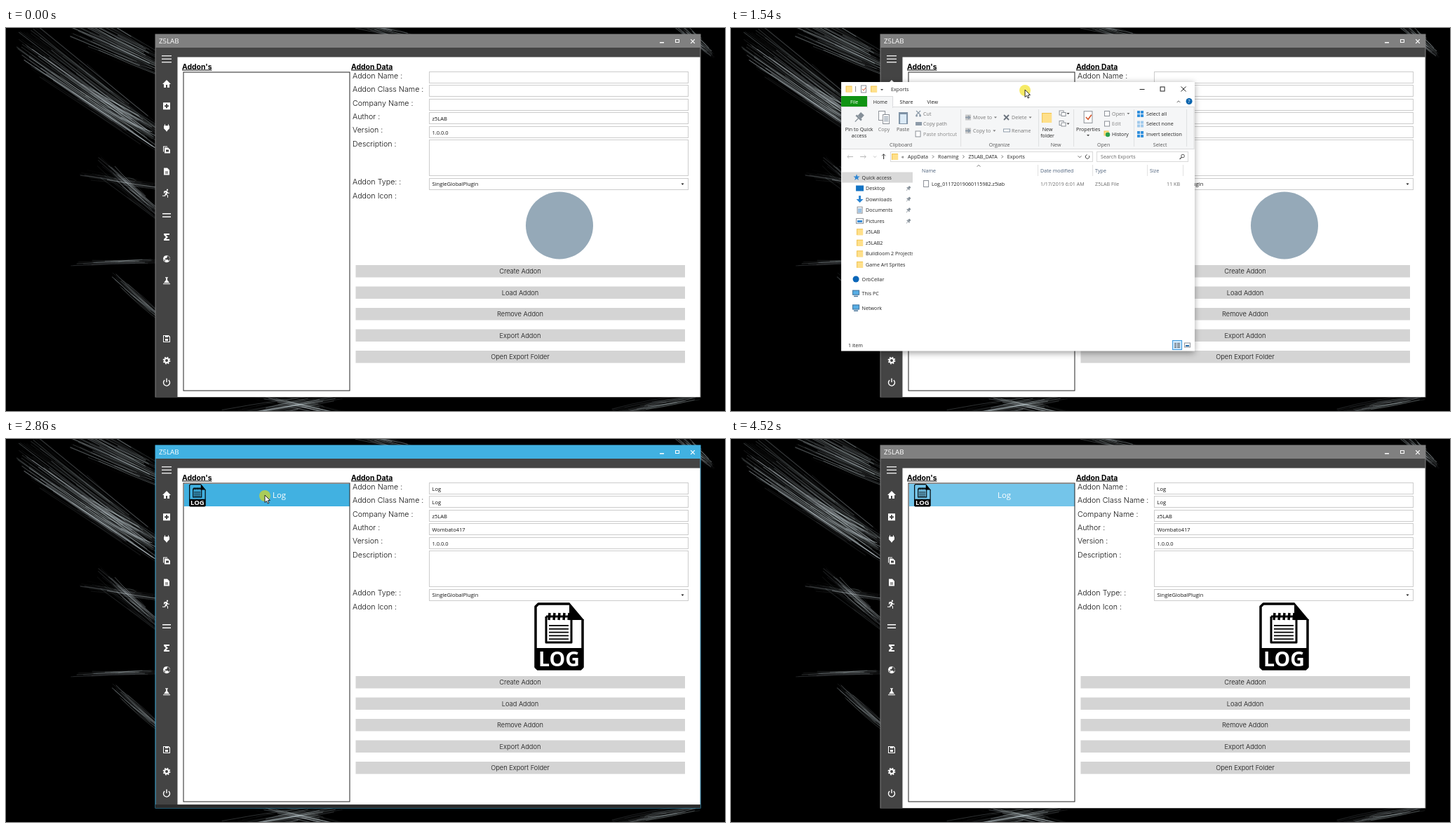
Animation, 1025 px wide and 546 px high, one loop 4.54 s. Source, as an HTML page with a canvas:

```html
<!DOCTYPE html>
<html lang="en">
<head>
<meta charset="utf-8">
<style>
html, body { margin: 0; width: 100%; height: 100%; overflow: hidden; background: #000; }
canvas { display: block; width: 1025px; height: 546px; }
</style>
</head>
<body>
<canvas id="stage" width="1025" height="546"></canvas>
<script>
const LOOP = 4540;
const UI = '"Open Sans", "Noto Sans", sans-serif';
const GEO = 'Inter, "Open Sans", sans-serif';
let g = document.getElementById('stage').getContext('2d');

// ---------- helpers ----------
const span = (t, a, b) => Math.max(0, Math.min(1, (t - a) / (b - a)));
const smooth = k => k * k * (3 - 2 * k);
const easeOut = k => 1 - (1 - k) ** 3;

function rect(x, y, w, h, fill, stroke) {
  if (fill) { g.fillStyle = fill; g.fillRect(x, y, w, h); }
  if (stroke) { g.strokeStyle = stroke; g.lineWidth = 1; g.strokeRect(x + .5, y + .5, w - 1, h - 1); }
}
// y is the middle of the capital letters
function text(s, x, y, size, color = '#111', align = 'left', font = UI, weight = 400) {
  g.font = `${weight} ${size}px ${font}`;
  g.textAlign = align;
  g.fillStyle = color;
  g.fillText(s, x, y + size * .36);
}
function trace(points) {
  g.beginPath();
  for (let i = 0; i < points.length; i += 2) g.lineTo(points[i], points[i + 1]);
}
function line(color, width, ...points) {
  g.strokeStyle = color; g.lineWidth = width;
  trace(points);
  g.stroke();
}
function poly(fill, ...points) {
  g.fillStyle = fill;
  trace(points);
  g.fill();
}
function disc(x, y, r, fill) {
  g.fillStyle = fill;
  g.beginPath(); g.arc(x, y, r, 0, 7); g.fill();
}
function arc(x, y, r, a, b, color, width) {
  g.strokeStyle = color; g.lineWidth = width;
  g.beginPath(); g.arc(x, y, r, a, b); g.stroke();
}
function cross(x, y, r, color, width) {
  line(color, width, x - r, y - r, x + r, y + r);
  line(color, width, x + r, y - r, x - r, y + r);
}
function at(x, y, scale, paint) {
  g.save();
  g.translate(x, y); g.scale(scale, scale);
  paint();
  g.restore();
}
const caret = (x, y, color = '#444') => poly(color, x - 2, y - 1, x + 2, y - 1, x, y + 1.3);
// (dx, dy) is the way the tip points
const chevron = (x, y, dx, dy, color = '#555') =>
  line(color, .9, x - dx - 2 * dy, y - dy - 2 * dx, x + dx, y + dy, x - dx + 2 * dy, y - dy + 2 * dx);

// ---------- wallpaper ----------
// start, end and half width of each sheaf of fibres
const SHEAVES = [
  [15, 15, 230, 170, 45], [100, 85, 230, 155, 20], [90, -10, 235, 60, 30],
  [105, 208, 230, 228, 8], [130, 190, 230, 275, 18], [90, 335, 230, 331, 5], [150, 350, 230, 420, 12],
  [280, 560, 480, 525, 14], [350, 522, 500, 556, 10], [860, 550, 990, 525, 8],
  [480, -10, 580, 12, 7], [950, -15, 1010, 40, 14]
];
function makeWallpaper() {
  const c = document.createElement('canvas');
  c.width = 1025; c.height = 546;
  const ink = c.getContext('2d');
  let seed = 11;
  const rnd = () => (seed = (seed * 16807) % 2147483647) / 2147483647;
  const off = s => (rnd() + rnd() - 1) * s;
  ink.fillRect(0, 0, 1025, 546);
  for (const [x0, y0, x1, y1, half] of SHEAVES)
    for (let i = 0; i < 12 + 2.5 * half; i++) {
      const shift = off(half), a = rnd() * .5, b = .6 + rnd() * .4;
      const px = k => x0 + (x1 - x0) * k;
      const py = k => y0 + (y1 - y0) * k + shift * (1.1 - .5 * k) + off(3);
      ink.strokeStyle = `rgba(200,212,216,${.05 + .4 * rnd() ** 3})`;
      ink.lineWidth = .4 + rnd() * .8;
      ink.beginPath();
      ink.moveTo(px(a), py(a));
      ink.quadraticCurveTo(px((a + b) / 2), py((a + b) / 2) + off(6), px(b), py(b));
      ink.stroke();
    }
  return c;
}
const wallpaper = makeWallpaper();

// ---------- main window ----------
// drawn in a 12 pixel square
const ICONS = [
  'M6 0 0 6h2v5h3V7h2v4h3V6h2z',
  'M1 1h10v10H1z M5 3v2H3v2h2v2h2V7h2V5H7V3z',
  'M4 1v2h4V1h1v2h1v4L7 10v1H5v-1L2 7V3h1V1z',
  'M1 1h6v1H2v7H1z M3 3h5l3 3v5H3z M5 6v3h4V6z',
  'M2 1h5l3 3v7H2z M4 6v1h4V6z M4 8v1h4V8z',
  'M6 0h2v2H6z M2 3l3-1 2 1 1 2h2v1H7L6 7l2 2v3H7V9L5 8 4 10H0V9h3l2-5-2 1v1H2z',
  'M0 3h12v1.500H0z M0 7.500h12V9H0z',
  'M2 1h8v2H5l3 3-3 3h5v2H2V9l3-3-3-3z',
  'M6 1a5 5 0 1 0 .01 0z M7 2h2l2 4-2 3-1-2H4V5h2z M1 6l3 2v2z',
  'M4 1h4v1H7v3l3 4H2l3-4V2H4z M1 10h10v1H1z',
  'M1 1h8l2 2v8H1z M2 2v8h8V4L8 2z M4 2h4v2H4z M4 6h4v3H4z'
].map(d => new Path2D(d));

function sidebar() {
  for (let i = -1; i < 2; i++) rect(222, 43.5 + 4.5 * i, 14, 1.4, '#e8e8e8');
  ICONS.forEach((icon, i) => at(223, 74 + 31.15 * i + (i > 9 ? 51.5 : 0), 1, () => {
    g.fillStyle = '#fff';
    g.fill(icon, 'evenodd');
  }));
  arc(229, 474, 3, 0, 7, '#fff', 2);
  g.setLineDash([1.8, 1.73]);
  arc(229, 474, 4.5, 0, 7, '#fff', 1.8);
  g.setLineDash([]);
  arc(229, 505.5, 4.5, -.9, Math.PI + .9, '#fff', 1.4);
  line('#fff', 1.4, 229, 499.5, 229, 505);
}

// 71 by 97 units
function logIcon(x, y, scale) {
  at(x, y, scale, () => {
    g.lineJoin = 'round';
    line('#000', 3.5, 50, 2, 6, 2, 2, 6, 2, 92, 5, 95, 66, 95, 69, 92, 69, 24);
    poly('#000', 50, 0, 71, 25, 50, 25);
    rect(2, 65, 67, 30, '#000');
    rect(17, 20, 36, 37, null, '#000');
    line('#000', 3, 17, 20, 17, 57, 53, 57, 53, 20, 17, 20);
    for (let i = 0; i < 5; i++) {
      line('#000', 3.5, 21 + i * 7, 25, 22 + i * 7, 15);
      line('#000', 1.8, 21, 33 + i * 4.8, 49, 33 + i * 4.8);
    }
    text('LOG', 35.5, 80.5, 28.5, '#fff', 'center', UI, 700);
  });
}

const LABELS = ['Addon Name', 'Addon Class Name', 'Company Name', 'Author', 'Version', 'Description', 'Addon Type:', 'Addon Icon'];
const BUTTONS = ['Create Addon', 'Load Addon', 'Remove Addon', 'Export Addon', 'Open Export Folder'];
const EMPTY = ['', '', '', 'z5LAB', '1.0.0.0'];
const LOADED = ['Log', 'Log', 'z5LAB', 'Wombato417', '1.0.0.0'];

function heading(s, x) {
  text(s, x, 55, 10.4, '#000', 'left', GEO, 700);
  rect(x, 59.5, g.measureText(s).width, 1, '#000');
}

function app(t, cur) {
  const active = (t >= 980 && t < 1110) || (t >= 2200 && t < 4520);
  const loaded = t >= 2820;
  const inFront = t < 1110 || t >= 2200;
  const over = (x, y, w, h) => cur && inFront && cur.x >= x && cur.x < x + w && cur.y >= y && cur.y < y + h;

  rect(212.5, 8.5, 778, 518, active ? '#41b1e1' : '#808080');
  rect(213.5, 28, 776, 498, '#444');
  rect(244.5, 41.5, 745, 484.5, '#fff');
  text('Z5LAB', 218, 19, 9.7, '#fff');
  rect(932, 20, 6, 1.5, '#fff');
  rect(954, 16, 6, 5, null, '#fff');
  cross(979, 19, 2.8, '#fff', 1.2);
  sidebar();

  heading("Addon's", 251);
  heading('Addon Data', 492);
  LABELS.forEach((s, i) => text(s + ' :', 494, 68 + 19.4 * i + (i > 5 ? 35 : 0), 10.7, '#111', 'left', GEO, 300));
  (loaded ? LOADED : EMPTY).forEach((s, i) => {
    const y = 62 + Math.round(i * 19.4);
    rect(603, y, 370, 17, '#fff', '#ccc');
    text(s, 607.5, y + 9, 7.5);
  });
  rect(603, 159, 370, 52, '#fff', '#ccc');
  rect(603, 214, 370, 17, '#fff', '#ccc');
  text('SingleGlobalPlugin', 607.5, 222.5, 7.6);
  caret(964.5, 222.5, '#111');

  if (t >= 2200) {
    const hover = over(254, 64, 236, 32);
    rect(254, 64, 236, 32, loaded ? (hover ? '#41b1e1' : '#74c5ea') : hover ? '#c6e7f6' : '#fff');
    logIcon(261, 64, .335);
    text('Log', 380, 80, 11.4, loaded ? '#fff' : '#111');
  }
  rect(252.5, 62.5, 238, 455, null, '#222');

  if (loaded) logIcon(753, 233, 1);
  else disc(789, 281.5, 48, '#95a9b8');

  BUTTONS.forEach((s, i) => {
    const y = 338 + 30.5 * i;
    const hover = over(498, y, 470, 18);
    rect(498.5, y, 469.5, 17.5, hover ? '#202020' : '#d4d4d4');
    text(s, 733, y + 8.8, 9.3, hover ? '#fff' : '#111', 'center', GEO, 300);
  });

  const up = easeOut(span(t, 2840, 3140)) - smooth(span(t, 3380, 3580));
  if (up > 0) {
    g.save();
    g.beginPath(); g.rect(213, 28, 777, 498); g.clip();
    g.translate(0, 25 * (1 - up));
    rect(213, 501, 777, 25, '#2b2b2b');
    line('#0fa010', 2, 230.5, 514, 233.5, 517.5, 239.5, 510.5);
    text('Log loaded successfully', 251, 514.5, 8.7, '#fff');
    g.restore();
  }
}

// ---------- file browser ----------
const small = (s, x, y, color = '#222', align = 'left') => text(s, x, y, 7.15, color, align);

function folder(x, y, s = 9) {
  rect(x - s / 2, y - s / 2, s, s, '#f0c24d');
  rect(x - s / 2 + 1, y - s / 2 + 1, s - 1, s - 1, '#ffe08a');
}
const page = (x, y, w = 7, h = 9) => rect(x - w / 2, y - h / 2, w, h, '#fff', '#8a8f96');
function checkedPage(x, y, k) {
  page(x, y, 8 * k, 11 * k);
  line('#d4552b', k, x - 2 * k, y, x, y + 2 * k, x + 3 * k, y - 2 * k);
}
function rules(x, y, w, n, color = '#3c87c9') {
  for (let i = 0; i < n; i++) rect(x, y + i * 2, w, 1, color);
}
function pin(x, y, k) {
  at(x, y, k, () => {
    g.rotate(.75);
    rect(-2.5, -5, 5, 5, '#858f98'); rect(-4, 0, 8, 2, '#858f98'); rect(-.5, 2, 1, 5, '#858f98');
  });
}
function star(x, y) {
  const points = [];
  for (let i = 0; i < 10; i++) {
    const r = i % 2 ? 2 : 4.8, a = (i / 5 - .5) * Math.PI;
    points.push(x + r * Math.cos(a), y + r * Math.sin(a));
  }
  poly('#2f86d2', ...points);
}

const GROUPS = ['Clipboard', 'Organize', 'New', 'Open', 'Select'];
const EDGES = [0, 170, 281, 331, 417, 492];

function ribbon(selected) {
  const on = selected ? '#222' : '#777', dim = '#888';
  const blue = selected ? '#2d7fc4' : '#8c9aa8';
  const row3 = i => 45 + 14.5 * i, row2 = i => 50.5 + 19 * i;
  const big = (x, color, ...words) => words.forEach((s, i) => small(s, x, 67.5 + 8.5 * i, color, 'center'));
  const withCaret = (s, x, y) => { small(s, x, y, on); caret(x + g.measureText(s).width + 5, y, on); };

  rect(0, 35, 503.5, 61, '#f5f6f7', '#dadbdc');
  rect(0, 20, 37, 15, '#0f9312');
  rect(37, 20, 37, 17, '#f5f6f7', '#dadbdc');
  rect(38, 34, 35, 3, '#f5f6f7');
  ['File', 'Home', 'Share', 'View'].forEach((s, i) => small(s, 18.5 + 37.2 * i, 28, i ? '#222' : '#fff', 'center'));
  chevron(481, 28, 0, -1.2);
  disc(496, 27.5, 4.5, '#0a64ad');
  small('?', 496, 27.5, '#fff', 'center');

  pin(26, 50, 1.3);
  big(25.5, '#222', 'Pin to Quick', 'access');
  page(58, 48, 10, 14); page(64, 53, 10, 14); rules(61, 49, 6, 4, blue);
  big(61, on, 'Copy');
  rect(82, 43, 13, 17, '#7d91a5'); rect(84, 46, 9, 13, '#dcebf7');
  big(88, '#555', 'Paste');
  cross(110, 44, 3, blue, 1.1);
  disc(107.5, 48, 1.5, blue); disc(112.5, 48, 1.5, blue);
  rect(106, 57, 9, 5, blue);
  page(109.5, 74, 8, 9);
  ['Cut', 'Copy path', 'Paste shortcut'].forEach((s, i) => small(s, 117, row3(i), i < 2 ? on : dim));

  ['Move to', 'Copy to'].forEach((s, i) => {
    const y = row2(i);
    rect(177, y - 4, 8, 8, selected ? '#f3cf66' : '#c8c8c8');
    poly(blue, 177, y - 1, 181, y - 1, 181, y - 3, 185, y, 181, y + 3, 181, y + 1, 177, y + 1);
    withCaret(s, 188, y);
  });
  cross(235.5, row2(0), 3.5, selected ? '#c0202a' : '#6c747e', 1.8);
  withCaret('Delete', 243, row2(0));
  rect(231, row2(1) - 3, 10, 5, '#fff', blue);
  small('Rename', 243, row2(1), on);

  folder(293, 51, 14);
  big(294, '#222', 'New', 'folder');
  for (let i = 0; i < 2; i++) {
    page(314, row3(i) - 1, 7, 7); page(317, row3(i) + 1, 7, 6); caret(323.5, row3(i));
  }
  checkedPage(352, 50, 1.6);
  big(352, '#222', 'Properties'); caret(352, 76);
  page(379, row3(0), 8, 8); withCaret('Open', 386, row3(0));
  page(379, row3(1), 8, 8); small('Edit', 386, row3(1), dim);
  folder(378, 73, 7); disc(380, 75, 3.2, '#2ba04b'); small('History', 386, row3(2));
  ['Select all', 'Select none', 'Invert selection'].forEach((s, i) => {
    for (let j = 0; j < 4; j++)
      rect(422 + (j % 2) * 5, row3(i) - 4 + (j >> 1) * 5, 4, 4, i == 1 ? '#9fc9ec' : '#2f8fdd');
    small(s, 435, row3(i));
  });
  GROUPS.forEach((s, i) => {
    small(s, (EDGES[i] + EDGES[i + 1]) / 2, 89, '#555', 'center');
    rect(EDGES[i + 1], 39, 1, 53, '#dedfe0');
  });
}

function addressBar() {
  const y = 106.5;
  for (const d of [-1, 1]) {
    const x = 22 + 9 * d;
    line('#b8b8b8', 1, x - 4, y, x + 4, y);
    chevron(x + 3 * d, y, d * 1.2, 0, '#b8b8b8');
  }
  chevron(48, y, 0, 1, '#bbb');
  line('#444', 1.2, 60.5, 110, 60.5, 103);
  chevron(60.5, 104, 0, -1.3, '#444');
  rect(70, 99, 289, 15, null, '#d9d9d9');
  rect(364, 99, 131, 15, null, '#d9d9d9');
  folder(76.5, y);
  small('«', 86, y);
  let x = 95;
  for (const s of ['AppData', 'Roaming', 'Z5LAB_DATA', 'Exports']) {
    if (x > 95) chevron(x - 7, y, 1, 0);
    small(s, x, y);
    x += g.measureText(s).width + 14;
  }
  chevron(340, y, 0, 1.2);
  arc(351, y, 2.8, -.6, 4.6, '#444', 1);
  small('Search Exports', 370, y, '#666');
  arc(487, y - 1, 2.3, 0, 7, '#555', 1);
  line('#555', 1.2, 485.4, y + .7, 482.5, y + 3.5);
}

const PLACES = ['Desktop', 'Downloads', 'Documents', 'Pictures', 'z5LAB', 'z5LAB2', 'Buildloom 2 Projects', 'Game Art Sprites'];

function navigation() {
  g.save();
  g.beginPath(); g.rect(1, 120, 101, 245); g.clip();
  rect(1, 128.5, 101, 15, '#d9d9d9');
  star(22, 136);
  small('Quick access', 29.5, 136);
  PLACES.forEach((s, i) => {
    const y = 151.5 + i * 15.55;
    small(s, 35, y);
    if (i > 3) return folder(26.5, y);
    pin(96, y, .65);
    if (i == 0) rect(21, y - 4, 11, 8, '#1273c4');
    if (i == 1) { rect(25, y - 5, 3, 6, '#2a84d2'); poly('#2a84d2', 21.5, y, 31.5, y, 26.5, y + 5); }
    if (i == 2) { page(26.5, y, 8, 10); rules(24, y - 2, 5, 3); }
    if (i == 3) { page(26.5, y, 11, 8); rect(23, y - 1, 7, 3, '#2f86d2'); }
  });
  ['OrbCellar', 'This PC', 'Network'].forEach((s, i) => {
    const y = 281 + 20.7 * i;
    if (i) { rect(16, y - 5, 10, 7, '#56aee6', '#49759a'); rect(18, y + 3, 6, 1.5, '#49759a'); }
    else disc(21, y, 4.5, '#0a66b8');
    small(s, 29.5, y);
  });
  g.restore();
}

const COLUMNS = { 'Name': 115, 'Date modified': 284, 'Type': 362, 'Size': 440 };

function fileList(selected, hover) {
  chevron(196, 119.5, 0, -1.2, '#666');
  for (const [s, x] of Object.entries(COLUMNS)) {
    small(s, x, 126.5, '#4c607a');
    if (x > 115) rect(x - 4, 118, 1, 16, '#e2e2e2');
  }
  rect(487, 118, 1, 16, '#e2e2e2');
  if (selected) rect(113, 138, 373, 15, '#cce8ff', '#99d1ff');
  else if (hover) rect(113, 138, 373, 15, '#e5f3ff');
  page(121, 145, 8, 10);
  small('Log_01172019060115982.z5lab', 129, 145.5);
  small('1/17/2019 6:01 AM', COLUMNS['Date modified'], 145.5, '#6d6d6d');
  small('Z5LAB File', COLUMNS.Type, 145.5, '#6d6d6d');
  small('11 KB', 483, 145.5, '#6d6d6d', 'right');
}

function browser(t, cur) {
  const moved = t < 1540 ? 0 : t < 1640 ? (cur.x - 419) / 329 : 1;
  const selected = t >= 1760;
  const open = easeOut(span(t, 1170, 1360));
  g.save();
  g.globalAlpha = open;
  g.translate(157 + 329 * moved + 251, 77 + 33 * moved + 191);
  g.scale(.9 + .1 * open, .9 + .1 * open);
  g.translate(-251, -191);
  g.shadowColor = 'rgba(0,0,0,.4)'; g.shadowBlur = 9; g.shadowOffsetY = 2;
  rect(0, 0, 504, 383.5, '#fff');
  g.shadowColor = 'transparent';

  folder(11, 10); rect(20, 6, 1, 8, '#888');
  checkedPage(32, 10, 1);
  folder(46.5, 10); caret(58, 11);
  small('Exports', 71, 10.5);
  line('#222', 1, 425.5, 10.5, 432.5, 10.5);
  rect(454.5, 6.5, 7, 7, null, '#222');
  cross(488, 10, 3.5, '#222', 1);

  ribbon(selected);
  addressBar();
  fileList(selected, t >= 1690);
  navigation();

  small('1 item', 10, 375.5);
  if (selected) { small('1 item selected', 45, 375.5); small('10.5 KB', 100, 375.5); }
  rect(472, 368, 14, 14, '#cce8ff', '#3a99dd');
  rules(475, 372, 3, 4, '#555'); rules(479, 372, 4, 4, '#555');
  page(493.5, 375, 9, 7); rect(491, 375, 5, 2, '#276ca8');
  g.restore();
}

// ---------- pointer ----------
const ENTER = { t: 60, x: 735, y: 515 }, EXIT = 3970;
// from time, to time, where to
const MOVES = [
  [60, 360, 730, 399], [360, 900, 724, 472], [1160, 1460, 419, 88], [1540, 1640, 748, 121],
  [1640, 1740, 665, 254], [1790, 2020, 370, 157], [2240, 2640, 369, 80], [2900, 3200, 381, 154],
  [3390, 3580, 380, 270], [3850, 3980, 620, 550]
];
const PRESSES = [[960, 1110], [1500, 1640], [1760, 2030], [2800, 2900]];

function pointerAt(t) {
  if (t < ENTER.t || t > EXIT) return null;
  let { x, y } = ENTER;
  for (const [a, b, tx, ty] of MOVES) {
    const k = smooth(span(t, a, b));
    x += (tx - x) * k;
    y += (ty - y) * k;
  }
  return { x, y };
}
function pointer(t, { x, y }) {
  if (PRESSES.some(([a, b]) => t >= a && t < b)) disc(x, y + 1, 8, 'rgba(240,222,0,.6)');
  at(x, y, 1, () => {
    const arrow = [0, 0, 0, 10.5, 2.5, 8.3, 4.2, 12, 5.9, 11.2, 4.3, 7.7, 7.5, 7.5];
    poly('#fff', ...arrow);
    line('#111', .9, ...arrow, 0, 0);
  });
}

function draw() {
  const t = performance.now() % LOOP;
  const cur = pointerAt(t);
  g.drawImage(wallpaper, 0, 0);
  app(t, cur);
  if (t >= 1180 && t < 2200) browser(t, cur);
  if (cur) pointer(t, cur);
  requestAnimationFrame(draw);
}
draw();
</script>
</body>
</html>
```
